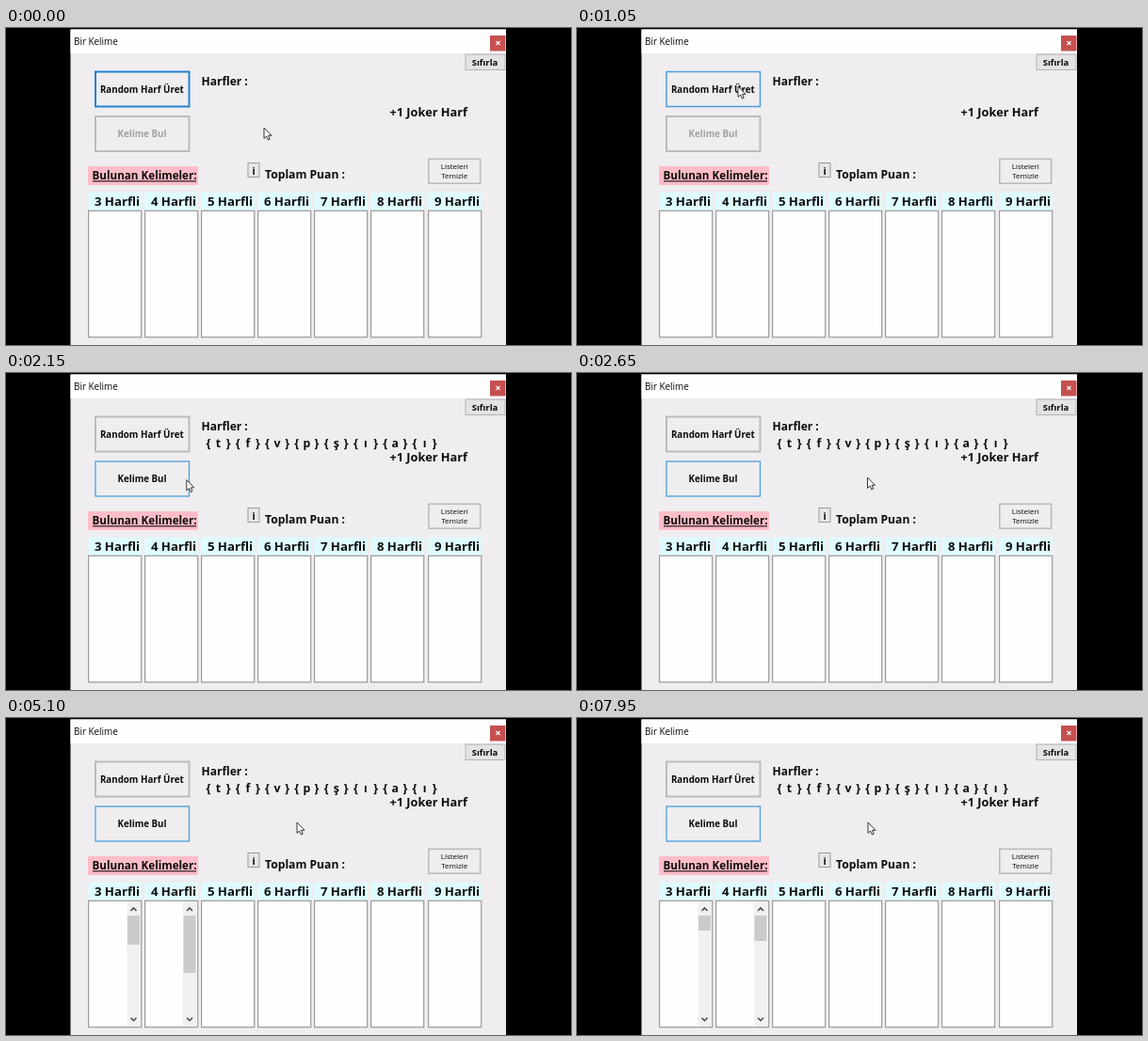
An HTML page for the animation above (8000 ms loop, 600x337 px).

```html
<!DOCTYPE html>
<html lang="tr">
<head>
<meta charset="utf-8">
<title>Bir Kelime</title>
<style>
  html, body { margin: 0; width: 100%; height: 100%; overflow: hidden; background: #000; }
  svg { display: block; width: 100vw; height: 100vh; }
  text {
    font-family: "Open Sans", "Noto Sans", sans-serif;
    font-variant-ligatures: none;
    white-space: pre;
    fill: #0c0c0c;
  }
  .b { font-weight: 700; }
</style>
</head>
<body>
<svg id="stage" viewBox="0 0 600 337"></svg>
<script>
const LOOP = 8000, STEP = 50;
const FACE = "#efedef", EDGE = "#bdbbbd", INK = "#0c0c0c";
const stage = document.getElementById("stage");

function add(tag, attrs, parent = stage) {
  const el = document.createElementNS("http://www.w3.org/2000/svg", tag);
  set(el, attrs);
  parent.appendChild(el);
  return el;
}

function set(el, attrs) {
  for (const k in attrs) el.setAttribute(k, attrs[k]);
}

const rect = (x, y, width, height, fill, parent) =>
  add("rect", { x, y, width, height, fill }, parent);

// Rectangle whose border lies inside the given edges
function box(x, y, w, h, fill, stroke, line = 1) {
  const el = rect(x + line / 2, y + line / 2, w - line, h - line, fill);
  set(el, { stroke, "stroke-width": line });
  return el;
}

function label(str, x, y, size, bold = true, anchor = "start", parent = stage) {
  const el = add("text", { x, y, "font-size": size, "text-anchor": anchor }, parent);
  if (bold) el.setAttribute("class", "b");
  el.textContent = str;
  return el;
}

// Window
rect(68.5, 1.5, 462.5, 335.5, FACE);
rect(68.5, 1.5, 462.5, 25.5, "#fefefe");
label("Bir Kelime", 72, 18, 9.9, false);
rect(514, 8, 16.5, 16.5, "#c5504f");
add("path", { d: "M520.5 14l4 4m0-4l-4 4", stroke: "#fff", "stroke-width": 1.1 });

box(487.5, 27.5, 43, 17.5, "#e4e2e4", "#b4b2b4");
label("Sıfırla", 508.5, 39.8, 9.5, true, "middle");

// Main buttons
const makeBox = box(94, 45.5, 101.5, 39, FACE, EDGE, 2);
label("Random Harf Üret", 144.3, 69, 9.75, true, "middle");
const findBox = box(94, 93, 101.5, 39, FACE, EDGE, 2);
const findText = label("Kelime Bul", 144.5, 116.2, 9.75, true, "middle");

// Letters
label("Harfler :", 207.5, 61.3, 12);
label("+1 Joker Harf", 407.5, 94, 12.75);
const letters = add("g", {});
[..."tfvpşıaı"].forEach((c, i) => {
  const x = 225.5 + 31.3 * i;
  label("{", x - 10.6, 78.6, 12.3, true, "middle", letters);
  label(c, x, 78.6, 12.3, true, "middle", letters);
  label("}", x + 10.6, 78.6, 12.3, true, "middle", letters);
});

// Score row
rect(87, 147, 117, 20, "#ffbdc9");
label("Bulunan Kelimeler:", 91.5, 161, 11.65);
rect(92, 162.3, 110, 1.1, INK);
box(256.5, 143, 13, 16, "#e8e6e8", "#9c9a9c");
label("i", 263, 155.8, 10.5, true, "middle");
label("Toplam Puan :", 275, 159.5, 12.15);
box(448, 138.5, 56.5, 27.5, FACE, EDGE, 1.6);
label("Listeleri", 476.3, 150, 8, false, "middle");
label("Temizle", 476.3, 160, 8, false, "middle");

// Word lists
for (let i = 0; i < 7; i++) {
  const x = Math.floor(87.2 + 60.15 * i);
  rect(x + 0.5, 175, 56.5, 18.5, "#defcff");
  label(i + 3 + " Harfli", x + 31, 188.9, 13.2, true, "middle");
  box(x, 193.7, 57.3, 135.6, "#fefefe", "#9a999c", 1.2);
}

function scrollbar(x) {
  const g = add("g", {});
  rect(x, 195, 14, 133, "#f1f0f2", g);
  const thumb = rect(x + 0.5, 210, 13, 0, "#cbcacc", g);
  const c = x + 7;
  add("path", {
    d: `M${c - 3} 205l3-3 3 3M${c - 3} 318.7l3 3 3-3`,
    fill: "none", stroke: "#4c4c4c", "stroke-width": 1.6
  }, g);
  return { g, thumb };
}
const bars = [scrollbar(128.5), scrollbar(188)];

// Bottom edge of each thumb: [time, y]
const ends = [
  [[3300, 278], [3600, 262], [3850, 258], [4150, 253], [4450, 251], [4800, 243],
   [5100, 241], [5400, 238], [5700, 233], [6950, 230], [7600, 227], [7900, 226]],
  [[3600, 302], [4150, 294], [4800, 281], [5100, 271], [5400, 257],
   [5700, 254], [6650, 253], [6950, 251], [7600, 239], [7900, 237]]
];

const cursor = add("path", {
  d: "M0 0V11.4L2.6 9 4.4 13 6.2 12.2 4.5 8.3H8Z",
  fill: "#fff", stroke: "#222", "stroke-width": 0.9, "stroke-linejoin": "round"
});

// Pointer moves: start, end, target x, target y
const home = [274, 106];
const moves = [
  [200, 550, 171, 62],
  [1100, 1600, 173.5, 114],
  [2000, 2650, 308.5, 111],
  [3800, 3850, 309, 111]
];

const ease = p => p * p * (3 - 2 * p);

function pointer(t) {
  let [x, y] = home;
  for (const [a, b, tx, ty] of moves) {
    const k = ease(Math.min(1, Math.max(0, (t - a) / (b - a))));
    x += (tx - x) * k;
    y += (ty - y) * k;
  }
  return [x, y];
}

const show = (el, on) => el.setAttribute("visibility", on ? "visible" : "hidden");

function draw(time) {
  const t = Math.floor(time / STEP) * STEP;
  const [x, y] = pointer(t);
  cursor.setAttribute("transform", `translate(${x.toFixed(2)} ${y.toFixed(2)})`);

  const over = top => x > 94 && x < 195 && y > top && y < top + 39;
  const ready = t >= 1100, searching = t >= 2000;
  const overMake = over(45.5);
  const lit = searching || (ready && over(93));

  set(makeBox, {
    stroke: searching ? EDGE : overMake ? "#4c9fdc" : "#2384cf",
    "stroke-width": overMake ? 1.5 : 2
  });
  set(findBox, {
    stroke: lit ? "#4c9fdc" : EDGE,
    "stroke-width": lit ? 1.3 : 2
  });
  findText.style.fill = ready ? INK : "#a3a1a3";
  show(letters, ready);

  bars.forEach((bar, i) => {
    const now = ends[i].filter(e => e[0] <= t).pop();
    show(bar.g, now);
    if (now) bar.thumb.setAttribute("height", now[1] - 210);
  });
}

function tick() {
  draw(performance.now() % LOOP);
  requestAnimationFrame(tick);
}
tick();
</script>
</body>
</html>
```
